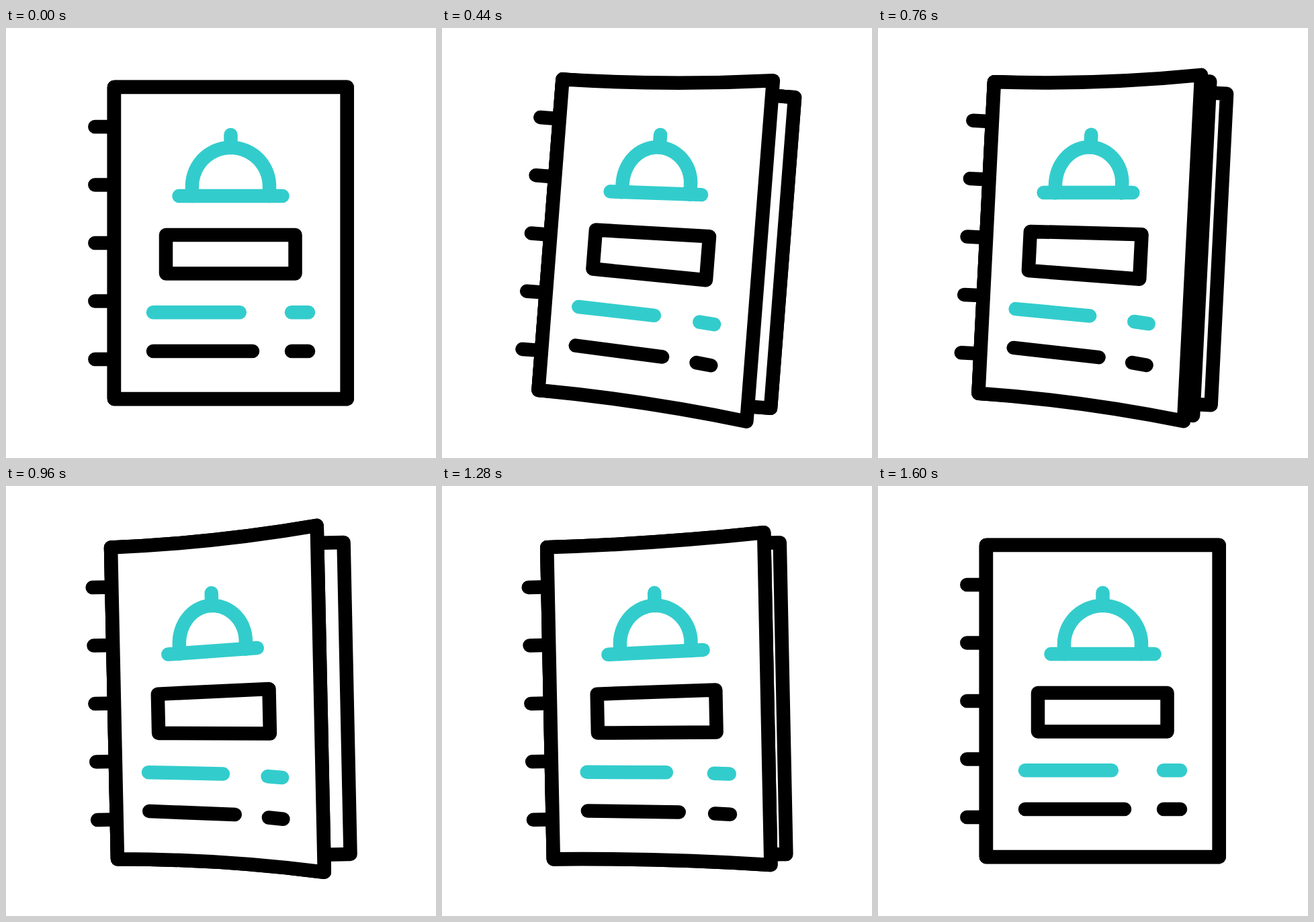
Animation of 640x640 px, one loop 1720 ms. Source, as an HTML page:

```html
<!DOCTYPE html>
<html lang="en">
<head>
<meta charset="utf-8">
<title>Menu book</title>
<style>
  html, body { margin: 0; width: 100%; height: 100%; overflow: hidden; background: #fff; }
  svg { display: block; width: 100%; height: 100%; }
  path { fill: none; stroke: #000; stroke-width: 20.5; stroke-linecap: round; stroke-linejoin: round; }
  .page { fill: #fff; }
  .teal { stroke: #3cc; }
</style>
</head>
<body>
<svg viewBox="0 0 640 640"><g id="book"></g></svg>
<script>
const LOOP = 1720, STEP = 40;
const LEFT = -159, RIGHT = 187.6, HALF = 232, WIDTH = RIGHT - LEFT;
const book = document.getElementById('book');

function addPath(cls) {
  const el = document.createElementNS('http://www.w3.org/2000/svg', 'path');
  if (cls) el.setAttribute('class', cls);
  book.appendChild(el);
  return el;
}

// Cubic easing with end handles at x1 and 1 - x2
function bezier(x1, x2) {
  return p => {
    if (p <= 0) return 0;
    if (p >= 1) return 1;
    let lo = 0, hi = 1, u = 0.5;
    for (let i = 0; i < 24; i++) {
      u = (lo + hi) / 2;
      const v = 1 - u;
      if (3 * v * v * u * x1 + 3 * v * u * u * x2 + u * u * u < p) lo = u; else hi = u;
    }
    return u * u * (3 - 2 * u);
  };
}
const swing = bezier(0.42, 0.66);
const settle = bezier(0.33, 0.43);
const smooth = bezier(1 / 3, 2 / 3);
const phase = (t, a, b, ease) => ease((t - a) / (b - a));

function polyline(points) {
  return 'M' + points.map(p => p[0].toFixed(2) + ' ' + p[1].toFixed(2)).join('L');
}

// Page outline whose free edge comes forward as k goes from 0 to 1
function pageShape(k) {
  const right = RIGHT - 39.3 * k, h = HALF + 26 * k;
  const mid = (LEFT + right) / 2, bow = HALF + 3 * k;
  return `M${LEFT} ${-HALF}Q${mid} ${-bow} ${right} ${-h}` +
    `V${h}Q${mid} ${bow} ${LEFT} ${HALF}Z`;
}

// Vertical bend of the printed parts, by height on the page
const bend = [[-161, 0], [-142, -1], [-70, -15], [-12, -7.3], [45.5, 7.6], [103, 18], [161, 24]];
function bendAt(y) {
  let i = 1;
  while (i < bend.length - 1 && y > bend[i][0]) i++;
  const [y0, v0] = bend[i - 1], [y1, v1] = bend[i];
  return v0 + (v1 - v0) * (y - y0) / (y1 - y0);
}
function warp([x, y], k) {
  const u = (x - LEFT) / WIDTH;
  return [x - k * (1.2 + 0.139 * (x - LEFT)), y + k * u * u * bendAt(y)];
}

function dome() {
  const cx = 14.5, cy = -84.5, r = 57.5, pts = [[cx - r, -70]];
  for (let i = 0; i <= 48; i++) {
    const a = Math.PI * (1 + i / 48);
    pts.push([cx + r * Math.cos(a), cy + r * Math.sin(a)]);
  }
  pts.push([cx + r, -70]);
  return pts;
}

const tabs = addPath();
tabs.setAttribute('d', [-173, -86.5, 0, 86.5, 173].map(y => `M-187.7 ${y}H${LEFT}`).join(''));
const back = addPath('page');
back.setAttribute('d', pageShape(0));
const inner = addPath('page');
const cover = addPath('page');

const bar = (x1, x2, y) => [[x1, y], [x2, y]];
const prints = [
  [dome(), 'teal'],
  [[[14.5, -161], [14.5, -142]], 'teal'],
  [bar(-62.5, 91.5, -70), 'teal'],
  [[[-82, -12], [110.5, -12], [110.5, 45.5], [-82, 45.5]], '', true],
  [bar(-101, 27.8, 103.3), 'teal'],
  [bar(105, 130, 103.3), 'teal'],
  [bar(-101, 47, 161), ''],
  [bar(105, 130, 161), '']
].map(([points, cls, closed]) => ({ points, closed, el: addPath(cls) }));

function draw(time) {
  const t = Math.floor((time % LOOP) / STEP) * STEP;
  const close = phase(t, 1100, 1600, settle);
  const angle = 5 * phase(t, 40, 540, swing) - 7 * phase(t, 560, 1060, swing) + 2 * close;
  const open = phase(t, 155, 525, smooth) * (1 - close);
  const follow = phase(t, 500, 930, smooth) * (1 - close);

  book.setAttribute('transform', `translate(320 320) rotate(${angle.toFixed(4)})`);
  inner.setAttribute('d', pageShape(follow));
  cover.setAttribute('d', pageShape(open));
  for (const { points, closed, el } of prints) {
    el.setAttribute('d', polyline(points.map(p => warp(p, open))) + (closed ? 'Z' : ''));
  }
}

const start = performance.now();
function tick() {
  draw(performance.now() - start);
  requestAnimationFrame(tick);
}
tick();
</script>
</body>
</html>
```
